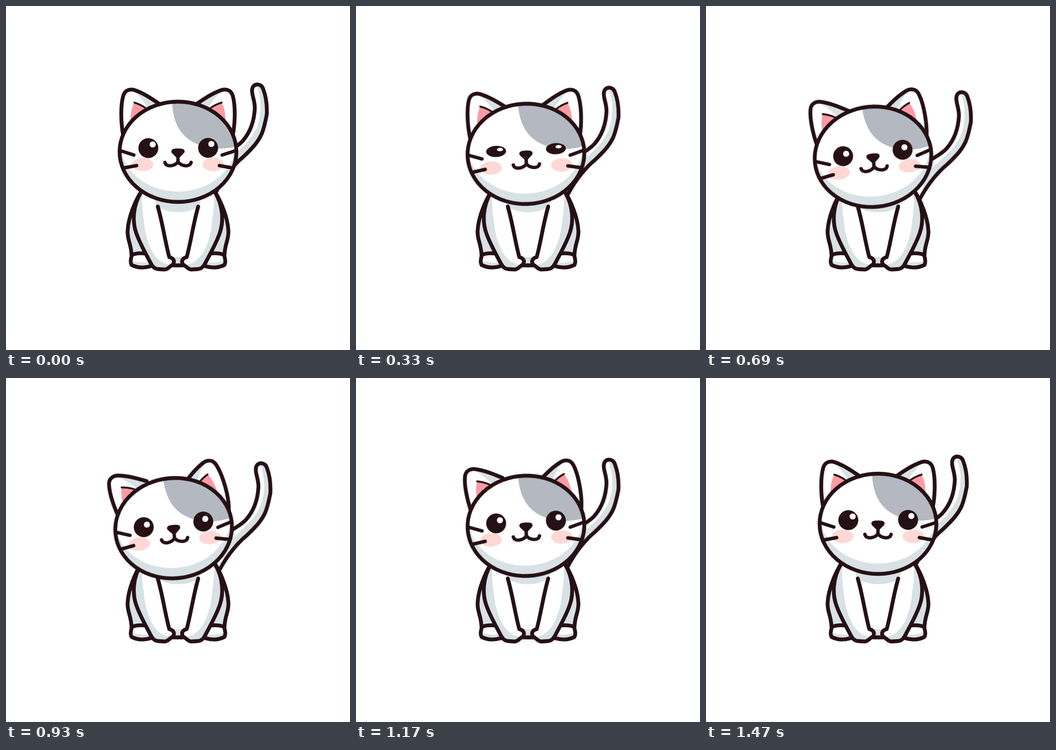
Recreate the animation shown at these times as an HTML page. Size 748x748 px, loop 1500 ms.

```html
<!DOCTYPE html>
<html lang="en">
<head>
<meta charset="utf-8">
<title>Cat</title>
<style>
  html, body { margin: 0; height: 100%; overflow: hidden; background: #fff; }
  svg { display: block; width: 100vw; height: 100vh; }

  .line { stroke: #251115; stroke-width: 8.3; stroke-linecap: round; stroke-linejoin: round; }
  .face { stroke-width: 7.4; }
  .thin { stroke-width: 4; }
  .none { fill: none; }
  .ink { fill: #251115; }
  .white { fill: #fff; }
  .shade { fill: #d8e1e4; }
  .grey { fill: #b4b9c1; }
  .pink { fill: #fe9aa4; }
  .blush { fill: #fed8d4; }

  /* sine easing there and back */
  .head, .tail, .glint {
    animation: 750ms cubic-bezier(.37, 0, .63, 1) infinite alternate;
  }
  .head { animation-name: tilt; transform-origin: 374px 317px; }
  .tail { animation-name: sway; transform-origin: 547px 169px; }
  .glint { animation-name: glint; }
  .ear, .eye { animation: 1500ms cubic-bezier(.37, 0, .63, 1) infinite; }
  .ear { animation-name: flick; }
  .ear.l { transform-origin: 312px 256px; }
  .ear.r { transform-origin: 452px 256px; }
  .eye { animation-name: blink; }
  .eye.l { transform-origin: 309.5px 309px; }
  .eye.r { transform-origin: 439.5px 308.5px; }

  @keyframes tilt { to { transform: translate(-11px, 11px) rotate(-6deg); } }
  @keyframes sway { to { transform: translate(9.5px, 17px) rotate(.4deg); } }
  @keyframes glint { to { transform: translate(-2.5px, 3.5px); } }
  @keyframes flick {
    0%, 30% { transform: rotate(0deg); }
    66% { transform: rotate(-13.5deg); }
    98%, 100% { transform: rotate(0deg); }
  }
  @keyframes blink {
    0%, 12% { transform: scaleY(1); }
    29% { transform: scaleY(.32); }
    46%, 100% { transform: scaleY(1); }
  }
</style>
</head>
<body>
<svg viewBox="0 0 748 748">
  <defs>
    <path id="tailShape" d="M468 326C495 309 507 302 515 293C533 272 540 246 541 222C541 205 535 196 535 184C535 167 555 167 559 180C566 198 568 215 567 236C564 252 561 266 556 278C548 296 536 309 515 329C500 341 476 368 458 402"/>
    <clipPath id="tailClip"><use href="#tailShape"/></clipPath>
    <ellipse id="skull" cx="374" cy="317" rx="127" ry="109"/>
    <clipPath id="skullClip"><use href="#skull"/></clipPath>

    <g id="haunch">
      <path class="shade line" d="M296 400C280 425 266 460 264.500 488C263 508 272 515 273 542L330 550"/>
      <path class="white" d="M274 541C283 537 292 537 303 538L316 566C300 570 285 570 273 564C270 558 271 550 274 541Z"/>
      <path class="shade" d="M272 554C285 557 298 559 311 558L316 567C300 570 285 570 273 564Z"/>
      <path class="none line" d="M303 538C292 537 283 537 274 541C271 550 270 558 273 563C284 569 299 570 314 566"/>
    </g>
    <g id="front">
      <path class="shade" d="M294 404C275 435 275 470 283 493C290 514 302 535 313 556C318 566 322 571 330 572L346 573C353 572 356 566 363 562C367 556 366 549 354 546L364 564H375V404Z"/>
      <path class="white" d="M375 400H297C293 440 300 460 302 487C308 515 318 545 341 558L359 565 366 553 355 546H375Z"/>
    </g>
    <g id="frontLine" class="none line">
      <path d="M294 404C275 435 275 470 283 493C290 514 302 535 313 556C318 566 322 571 330 572L346 573C353 572 356 566 363 562C367 556 366 549 355 546C345 508 341 474 330 436"/>
      <path d="M363 564H375"/>
    </g>
    <g id="earShape">
      <path class="white" d="M262 304C249 275 248 220 255 195C259 182 270 180 280 183C298 189 316 201 335 214L300 285Z"/>
      <path class="shade" d="M277 184C296 188 316 201 335 214L310 224C300 207 290 196 277 184Z"/>
      <path class="pink" d="M279 210L305 224 290 256 271 256C270 236 273 222 279 210Z"/>
      <path class="none line thin" d="M279 210Q293 214 305 223"/>
      <path class="none line" d="M262 304C249 275 248 220 255 195C259 182 270 180 280 183C298 189 316 201 335 214"/>
    </g>
    <g id="cheek">
      <ellipse class="blush" cx="297" cy="344.5" rx="23.5" ry="14.5"/>
      <path class="none line face" d="M250 315L278 324M254 352.500L284 347"/>
    </g>
  </defs>

  <g class="tail">
    <use href="#tailShape" class="white"/>
    <path class="shade" clip-path="url(#tailClip)" d="M545 174C558 205 555 247 542 271C526 300 505 316 470 347L458 410H580V170Z"/>
    <use href="#tailShape" class="none line"/>
  </g>

  <g class="body">
    <use href="#haunch"/>
    <use href="#haunch" transform="matrix(-1 0 0 1 748 0)"/>
    <use href="#front"/>
    <use href="#front" transform="matrix(-1 0 0 1 748 0)"/>
    <ellipse class="shade" cx="374" cy="425" rx="49" ry="23.5"/>
    <use href="#frontLine"/>
    <use href="#frontLine" transform="matrix(-1 0 0 1 748 0)"/>
  </g>

  <g class="head">
    <g class="ear l"><use href="#earShape"/></g>
    <g class="ear r"><use href="#earShape" transform="matrix(-1 0 0 1 748 0)"/></g>
    <use href="#skull" class="shade"/>
    <g clip-path="url(#skullClip)">
      <ellipse class="white" cx="374" cy="296" rx="126" ry="107.5"/>
      <path class="grey" d="M361 200C361 252 378 286 420 302C446 312 474 313 506 304V200Z"/>
    </g>
    <use href="#skull" class="none line"/>
    <use href="#cheek"/>
    <use href="#cheek" transform="matrix(-1 0 0 1 748 0)"/>
    <g class="eye l">
      <circle class="ink" cx="309.5" cy="309" r="21.7"/>
      <circle class="white glint" cx="319" cy="301" r="6.6"/>
    </g>
    <g class="eye r">
      <circle class="ink" cx="439.5" cy="308.5" r="21.7"/>
      <circle class="white glint" cx="446.5" cy="300" r="6.6"/>
    </g>
    <path class="ink" d="M365 310.500Q374 309 383 310.500C389 312 390 317 386 321L378 329Q374 332 370 329L362 321C358 317 359 312 365 310.500Z"/>
    <path class="none line face" d="M345.500 340C348 351 366 349 374 339C382 349 400 351 402.500 340M374 326V339"/>
  </g>
</svg>
</body>
</html>
```
